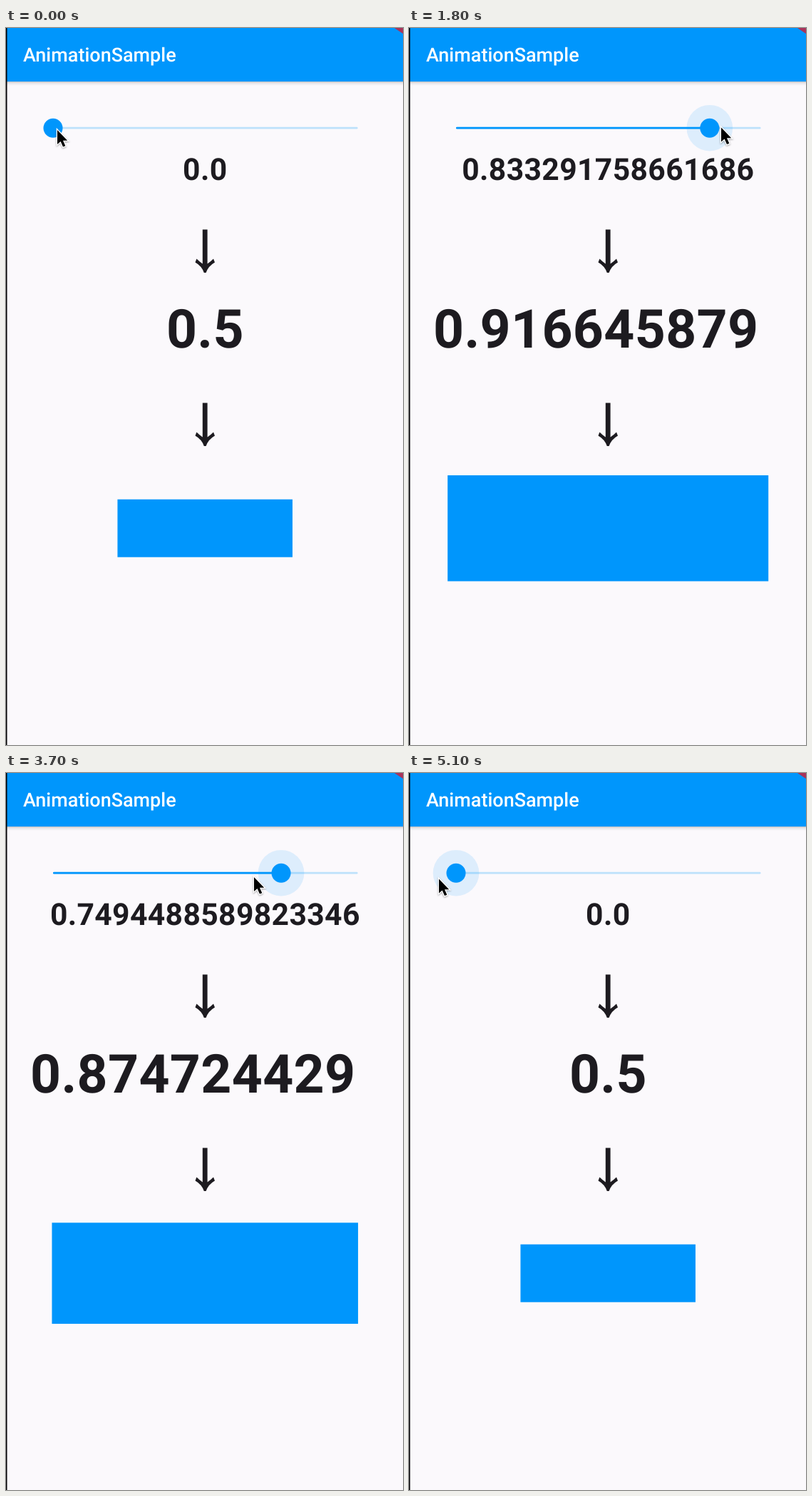
Animation, 557 px wide and 1005 px high, one loop 5.3 s. Source, as an HTML page:

```html
<!DOCTYPE html>
<html lang="en">
<head>
<meta charset="utf-8">
<title>AnimationSample</title>
<style>
  html, body { margin: 0; width: 100%; height: 100%; overflow: hidden; background: #fbf9fc; }
  svg { display: block; width: 100%; height: 100%; }
  text {
    font-family: Roboto, sans-serif; font-weight: 700; fill: #1d1b20;
    letter-spacing: .337px; text-rendering: geometricPrecision;
  }
  .title { font-weight: 500; font-size: 27px; fill: #fff; letter-spacing: 0; }
  .blue { fill: #0096fc; }
</style>
</head>
<body>
<svg viewBox="0 0 557 1005">
  <defs>
    <linearGradient id="shade" x2="0" y2="1">
      <stop stop-color="#000" stop-opacity=".22"/>
      <stop offset=".4" stop-color="#000" stop-opacity=".07"/>
      <stop offset="1" stop-color="#000" stop-opacity="0"/>
    </linearGradient>
    <path id="arrow" fill="#1d1b20" d="M275.8 282.5H282.6V330.5Q287 327.5 291 323.5L293 328.5Q284 333.5 280.6 343H277.8Q274.5 333.5 265.5 328.5L267.4 323.5Q271.4 327.5 275.8 330.5Z"/>
  </defs>
  <rect width="557" height="1005" fill="#fbf9fc"/>
  <rect y="75" width="557" height="6" fill="url(#shade)"/>
  <rect class="blue" width="557" height="75"/>
  <path d="M545 0H557V8Z" fill="#a8335a"/>
  <rect width="1.5" height="1005"/>
  <text class="title" x="24" y="47.4">AnimationSample</text>

  <rect x="66" y="138.8" width="427.5" height="2.7" rx="1.3" fill="#bde1fb"/>
  <rect id="active" class="blue" x="66" y="138.8" height="2.7" rx="1.3"/>
  <circle id="halo" class="blue" cy="140.2" opacity=".12"/>
  <circle id="thumb" class="blue" cy="140.2" r="13.5"/>

  <text id="value" x="279.3" y="212.8" font-size="42.7" text-anchor="middle"></text>
  <use href="#arrow"/>
  <text id="scaled" y="448" font-size="75.1"></text>
  <use href="#arrow" y="243"/>
  <rect id="box" class="blue"/>

  <path id="pointer" d="M0 0V20L4.6 16 8 23.6 11.3 22.2 8 14.8H14.2Z" stroke="#fff" stroke-width="2.6"
    paint-order="stroke" style="filter: drop-shadow(0 1px 1px rgba(0,0,0,.35))"/>
</svg>
<script>
const LOOP = 5300, STEP = 100, LAST = 5100;
const LEFT = 66, TRACK = 427, MID_X = 279.2, MID_Y = 701.2;

// Turning points of the drag: [time, slider value, pointer x, pointer y]
const drag = [
  [0, 0, 72, 143],
  [300, 0, 88, 145],
  [700, 0.18927798063858692, 186, 150.5],
  [1800, 0.833291758661686, 438, 139.5],
  [2600, 0.9963352369225558, 489, 136.5],
  [3150, 0.9963352369225558, 489, 136.5],
  [3300, 0.9827217433763596, 465, 137.5],
  [4100, 0.4275141176970107, 222, 152.5],
  [4900, 0, 47, 149.5],
  [LAST, 0, 42, 148.5]
];

const $ = id => document.getElementById(id);
const set = (id, attrs) => {
  for (const name in attrs) $(id).setAttribute(name, attrs[name]);
};
const clamp = x => Math.max(0, Math.min(1, x));

function slope(i, col) {
  const a = drag[i], b = drag[i + 1];
  return a && b ? (b[col] - a[col]) / (b[0] - a[0]) : 0;
}

// Harmonic mean of both sides, so the curve never overshoots.
function tangent(i, col) {
  const a = slope(i - 1, col), b = slope(i, col);
  return a * b > 0 ? 2 * a * b / (a + b) : 0;
}

function at(t, col) {
  const i = drag.findLastIndex(row => row[0] <= t), a = drag[i], b = drag[i + 1];
  if (!b) return a[col];
  const span = b[0] - a[0], k = (t - a[0]) / span, rest = 1 - k;
  return a[col] + (b[col] - a[col]) * k * k * (3 - 2 * k)
    + span * k * rest * (tangent(i, col) * rest - tangent(i + 1, col) * k);
}

function draw(now) {
  const t = Math.min(LAST, Math.floor(now % LOOP / STEP) * STEP);
  const value = at(t, 1), scale = 0.5 + value / 2, thumb = LEFT + TRACK * value;
  const w = 491 * scale, h = 162 * scale;

  set('active', { width: thumb - LEFT });
  set('halo', { cx: thumb, r: 32.3 * clamp((t - 200) / 150) });
  set('thumb', { cx: thumb });
  set('box', { x: MID_X - w / 2, y: MID_Y - h / 2, width: w, height: h });
  set('pointer', { transform: `translate(${at(t, 2)} ${at(t, 3)})` });

  // A long number is cut at the line end and starts at the left edge.
  const wide = value > 0;
  $('value').textContent = wide ? value : '0.0';
  $('scaled').textContent = String(scale).slice(0, 11);
  set('scaled', { x: wide ? 34 : 279.4, 'text-anchor': wide ? 'start' : 'middle' });
}

const start = performance.now();
function tick() {
  draw(performance.now() - start);
  requestAnimationFrame(tick);
}
tick();
</script>
</body>
</html>
```
